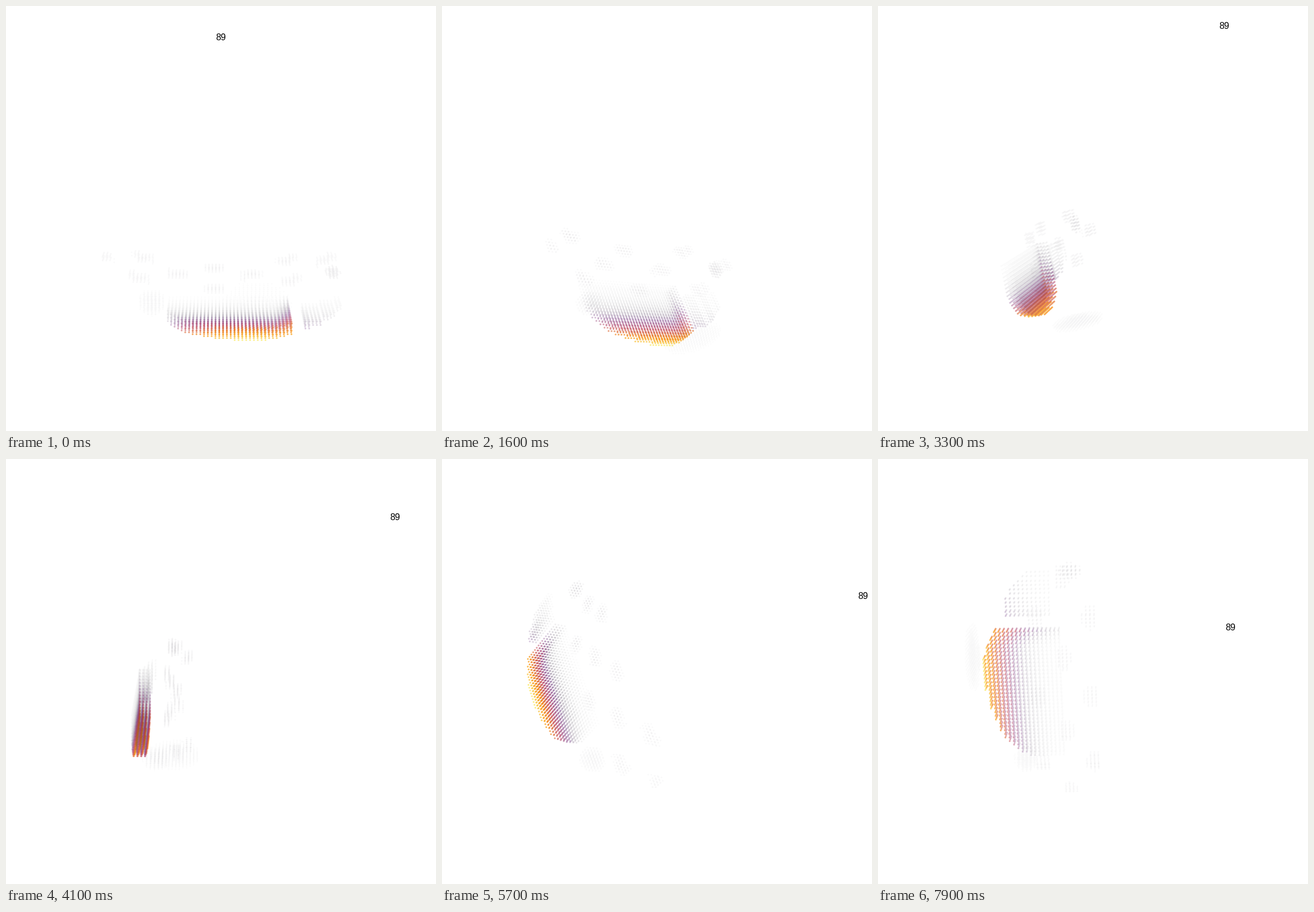
Write an HTML page with a canvas that moves like this. It is 753 by 744 pixels and loops after 8000 ms.

```html
<!DOCTYPE html>
<html lang="en">
<head>
<meta charset="utf-8">
<title>Spinning point cloud</title>
<style>
html, body { margin: 0; width: 100%; height: 100%; overflow: hidden; background: #fff; }
canvas { display: block; }
</style>
</head>
<body>
<canvas id="stage" width="753" height="744"></canvas>
<script>
const ctx = document.getElementById('stage').getContext('2d');
const W = 753, H = 744, CX = W / 2, CY = H / 2;
const LOOP = 8000, STEP = 100, DEG_PER_MS = 0.03;
const EYE = 1388;                       // camera distance in pixels
const SIN = Math.sin(Math.PI / 9), COS = Math.cos(Math.PI / 9);
const GRID = { x: 6.25, y: 6.6, z: 6.6 }, ORIGIN = { x: 3.4, y: -164, z: -150 };
const LABEL = { x: 0, y: 277, z: 277 };
const DOT = 1.6;

const clamp = (v, a, b) => Math.min(b, Math.max(a, v));
const bow = u => 1 - Math.sqrt(Math.max(0, 1 - u * u));

// black -> violet -> red -> orange -> yellow
const RAMP = [[0, 0, 4], [87, 16, 110], [188, 55, 84], [249, 142, 9], [250, 245, 120]];

function ramp(v) {
  const p = clamp(v, 0, 1) * (RAMP.length - 1);
  const i = Math.min(RAMP.length - 2, Math.floor(p));
  return RAMP[i].map((c, k) => Math.round(c + (RAMP[i + 1][k] - c) * (p - i)));
}

const points = [];
function add(x, y, z, v, alpha) {
  if (alpha < 0.008) return;
  points.push({ x, y, z, fill: `rgba(${ramp(v)},${alpha.toFixed(3)})` });
}

function scan(axis, from, to, visit) {
  const s = GRID[axis], o = ORIGIN[axis];
  for (let i = Math.ceil((from - o) / s); i * s + o <= to; i++) visit(i * s + o);
}

function scanBox(x0, x1, y0, y1, z0, z1, visit) {
  scan('x', x0, x1, x => scan('y', y0, y1, y => scan('z', z0, z1, z => visit(x, y, z))));
}

// Main body: bright on its outer rim, fading inwards
scanBox(-92, 119, -168, -45, -151, -128, (x, y, z) => {
  const rim = -166 + 75 * bow((x - 55) / (x > 55 ? 90 : 147));
  if (y < rim) return;
  const lift = z + 150;
  const edge = clamp((x - 90) / 25, 0, 1);
  const e = (y + 164 + 0.9 * lift) * (1 - 0.35 * edge);
  const v = e < 64 ? 0.97 - 0.013 * e : 0.138 * Math.exp((64 - e) / 18);
  add(x, y, z, v, Math.min(0.75, 0.008 + v * 0.9));
});

// Smaller body beyond the gap
scanBox(135, 209, -132, -58, -151, -110, (x, y, z) => {
  const rim = -130 + 64 * bow((x - 140) / 70);
  const lift = z + 150 - 0.3 * Math.max(0, x - 150);
  if (y < rim || lift < 0 || lift > 14) return;
  const v = 0.32 * Math.exp(-(y + 128) / 28 - (x - 135) / 70 - lift / 30);
  add(x, y, z, v, 0.01 + v * 0.8);
});

// Faint patches on a shallow bowl
scanBox(-205, 205, -110, 25, -100, -45, (x, y, z) => {
  const wave = Math.cos((x + 11) / 20.4) * Math.cos(y / 14);
  if (wave < 0.55 || Math.abs(z + 92 - 0.001 * x * x) > 7) return;
  add(x, y, z, 0.06, 0.035 * wave);
});

function clump(cx, cy, cz, rx, ry, rz, alpha) {
  scanBox(cx - rx, cx + rx, cy - ry, cy + ry, cz - rz, cz + rz, (x, y, z) => {
    const d = ((x - cx) / rx) ** 2 + ((y - cy) / ry) ** 2 + ((z - cz) / rz) ** 2;
    if (d < 1) add(x, y, z, 0.06, alpha * (1.1 - 0.6 * d));
  });
}
clump(196, -28, -90, 14, 20, 12, 0.06);     // front
clump(55, -193, -80, 58, 10, 50, 0.02);     // side wall
clump(-115, -112, -108, 24, 20, 24, 0.025); // back

// Turn about the (1,1,1) diagonal, tilt, then project in perspective
function projector(deg) {
  const term = shift => (1 + 2 * Math.cos((deg + shift) * Math.PI / 180)) / 3;
  const f = term(0), g = term(-120), h = term(120);
  return p => {
    const x = f * p.x + h * p.y + g * p.z;
    const y = g * p.x + f * p.y + h * p.z;
    const z = h * p.x + g * p.y + f * p.z;
    const depth = SIN * z - COS * y;
    const k = EYE / (EYE - depth);
    return { x: CX + x * k, y: CY - (SIN * y + COS * z) * k, depth, fill: p.fill };
  };
}

function draw(ms) {
  const project = projector(ms * DEG_PER_MS);
  ctx.fillStyle = '#fff';
  ctx.fillRect(0, 0, W, H);
  const dots = points.map(project).sort((a, b) => a.depth - b.depth);
  for (const d of dots) {
    ctx.fillStyle = d.fill;
    ctx.beginPath();
    ctx.arc(d.x, d.y, DOT, 0, Math.PI * 2);
    ctx.fill();
  }
  const at = project(LABEL);
  ctx.fillStyle = '#000';
  ctx.font = '16px "Liberation Sans", Arial, sans-serif';
  ctx.letterSpacing = '-0.9px';
  ctx.textAlign = 'center';
  ctx.fillText('89', Math.round(at.x - 0.5), Math.round(at.y + 5.5));
}

let shown = -1;
function tick() {
  const ms = Math.floor((performance.now() % LOOP) / STEP) * STEP;
  if (ms !== shown) draw(shown = ms);
  requestAnimationFrame(tick);
}
tick();
</script>
</body>
</html>
```
